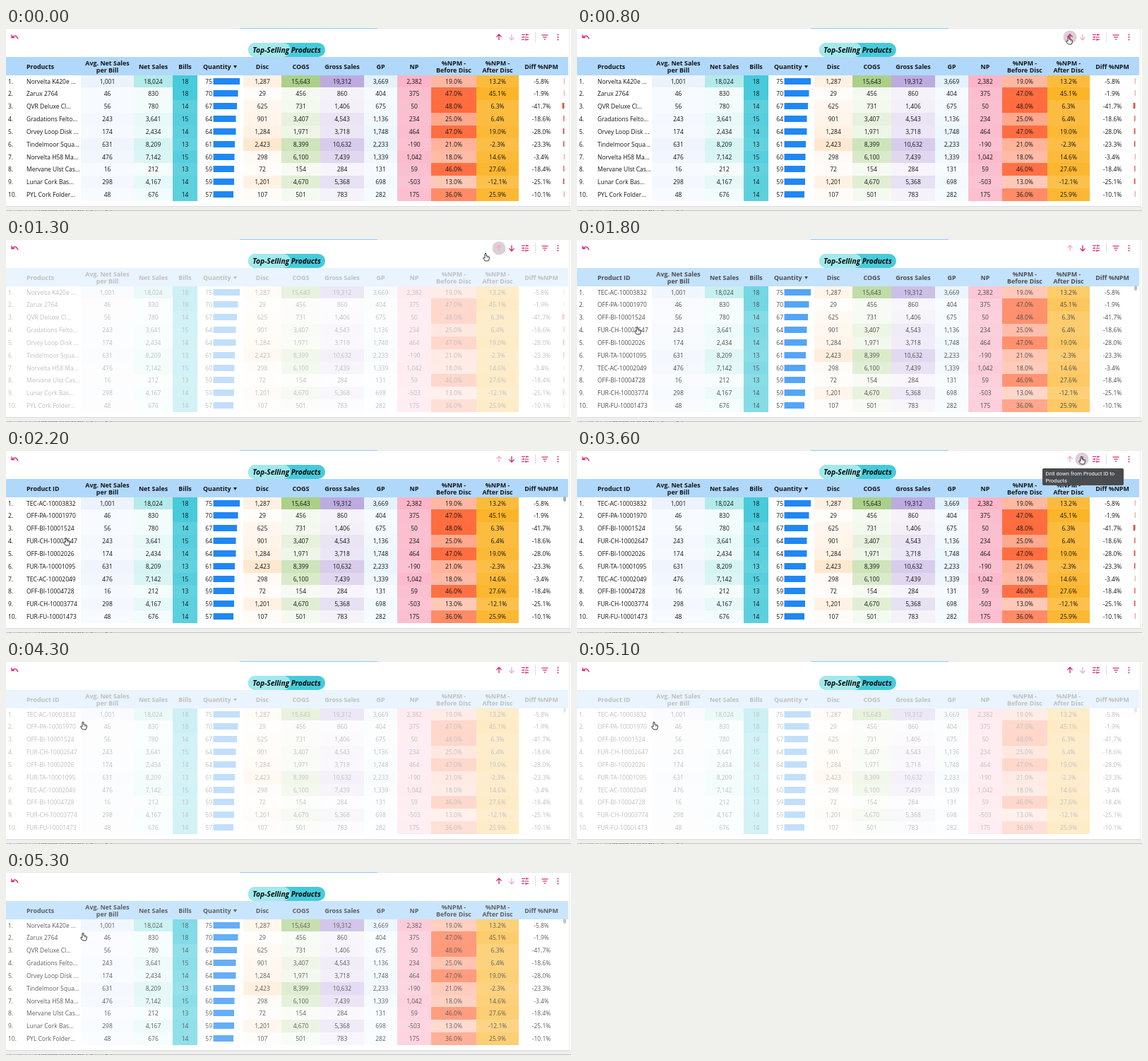
These frames come from a looping animation (800 by 259 pixels, 5.4 s). An HTML page with a canvas:

```html
<!DOCTYPE html>
<html lang="en">
<head>
<meta charset="utf-8">
<title>Top-Selling Products</title>
<style>
html, body { margin: 0; width: 100%; height: 100%; overflow: hidden; background: #fff; }
canvas { display: block; width: 800px; height: 259px; }
</style>
</head>
<body>
<canvas id="stage" width="800" height="259"></canvas>
<script>
const ctx = document.getElementById('stage').getContext('2d');
const LOOP = 5400, STEP = 100;
const TOP = 67, ROW = 17.85, WIDTH = 796;
const FONT = '"Open Sans", "Noto Sans", sans-serif';
const PINK = '#d81b72', PINK_DIM = '#f0a9cb', INK = '#141414';

const num = v => Math.round(v).toLocaleString('en-US');
const pct = v => v.toFixed(1) + '%';
const rowY = i => Math.floor(TOP + i * ROW);

// All other figures follow from these five
const products = [
  ['Norvelta K420e ...', 'TEC-AC-10003832', 18, 75, 1287.4, 19311.8, 19],
  ['Zarux 2764', 'OFF-PA-10001970', 18, 70, 29.3, 859.7, 47],
  ['QVR Deluxe Cl...', 'OFF-BI-10001524', 14, 67, 625.15, 1405.6, 48],
  ['Gradations Felto...', 'FUR-CH-10002647', 15, 64, 901.3, 4542.7, 25],
  ['Orvey Loop Disk ...', 'OFF-BI-10002026', 14, 64, 1284, 3718.2, 47],
  ['Tindelmoor Squa...', 'FUR-TA-10001095', 13, 61, 2423, 10632, 21],
  ['Norvelta H58 Ma...', 'TEC-AC-10002049', 15, 60, 297.55, 7439.4, 18],
  ['Mervane Ulst Cas...', 'OFF-BI-10004728', 13, 59, 72.2, 284.4, 46],
  ['Lunar Cork Bas...', 'FUR-CH-10003774', 14, 59, 1201, 5368, 13],
  ['PYL Cork Folder...', 'FUR-FU-10001473', 14, 57, 107, 783, 36]
].map(([name, id, bills, qty, disc, gross, before]) => {
  const net = gross - disc, gp = gross * before / 100, np = gp - disc;
  const after = np / net * 100;
  return { name, id, bills, qty, disc, gross, before, net, gp, np, after,
    avg: net / bills, cogs: gross - gp, diff: after - before };
});

// Field, title, width, heat colour and its strength at the lowest value
let edge = 106;
const columns = [
  ['avg', 'Avg. Net Sales|per Bill', 75, '#ecf3fd', .4],
  ['net', 'Net Sales', 55, '#b4ebea', .15],
  ['bills', 'Bills', 35, '#47cada', .85],
  ['qty', 'Quantity', 65],
  ['disc', 'Disc', 54, '#ffe8d0', .12],
  ['cogs', 'COGS', 55, '#abd08a', .1],
  ['gross', 'Gross Sales', 62, '#bdabdf', .13],
  ['gp', 'GP', 47, '#e3f2fd', .3],
  ['np', 'NP', 48, '#fbb4c8', .8],
  ['before', '%NPM -|Before Disc', 64, '#ff6c3e', .37],
  ['after', '%NPM -|After Disc', 60, '#fcb428', .83],
  ['diff', 'Diff %NPM', 64]
].map(([key, title, w, color, floor]) => {
  const values = products.map(p => p[key]), x = edge;
  edge += w;
  return { key, title, w, color, floor, x, mid: x + w / 2,
    min: Math.min(...values), max: Math.max(...values),
    format: title.includes('%') ? pct : num };
});

// Cursor keys: time, x, y of the fingertip
const path = [[500, 620, 60], [800, 696, 12], [1200, 696, 12], [1300, 679, 20], [1700, 85, 124],
  [2300, 85, 124], [2800, 684, 10], [3100, 714, 9], [3900, 714, 9], [4200, 109, 86]];

const ramp = (t, from, len) => Math.min(1, Math.max(0, (t - from) / len));
const smooth = k => k * k * (3 - 2 * k);
const during = (t, a, b) => t >= a && t < b;
const veil = t => .73 * (ramp(t, 900, 200) - ramp(t, 1600, 300) + ramp(t, 3700, 200) - ramp(t, 5130, 300));

function cursorAt(t) {
  let [, x, y] = path[0];
  for (let i = 1; i < path.length; i++) {
    const [from, x0, y0] = path[i - 1], [to, x1, y1] = path[i];
    const k = smooth(ramp(t, from, to - from));
    x += (x1 - x0) * k;
    y += (y1 - y0) * k;
  }
  return { x, y };
}

function rect(x, y, w, h, fill) {
  ctx.fillStyle = fill;
  ctx.fillRect(x, y, w, h);
}

function pill(x, y, w, h, r, fill) {
  ctx.fillStyle = fill;
  ctx.beginPath();
  ctx.roundRect(x, y, w, h, r);
  ctx.fill();
}

function text(s, x, y, { size = 8.5, weight = '500', align = 'center', color = INK, family = FONT } = {}) {
  ctx.font = `${weight} ${size}px ${family}`;
  ctx.textAlign = align;
  ctx.fillStyle = color;
  ctx.fillText(s, x, y);
}

function lines(color, width, ...paths) {
  ctx.strokeStyle = color;
  ctx.lineWidth = width;
  ctx.beginPath();
  for (const p of paths)
    for (let i = 0; i < p.length; i += 2) i ? ctx.lineTo(p[i], p[i + 1]) : ctx.moveTo(p[0], p[1]);
  ctx.stroke();
}

function heading(title, x, align = 'center') {
  const parts = title.split('|');
  const first = parts.length > 1 ? 53 : 57.5;
  parts.forEach((s, i) => text(s, x, first + i * 9.5, { size: 8.9, weight: 'bold', align }));
}

function heatCell(col, value, y, h) {
  ctx.globalAlpha = col.floor + (1 - col.floor) * (value - col.min) / (col.max - col.min);
  rect(col.x, y, col.w, h, col.color);
  ctx.globalAlpha = 1;
}

function tableRow(p, i, byId, hovered) {
  const y = rowY(i), base = y + 12;
  text(i + 1 + '.', 3, base, { align: 'left' });
  text(byId ? p.id : p.name, 29, base, { align: 'left' });
  for (const col of columns) {
    const value = p[col.key];
    if (col.color) heatCell(col, value, y, rowY(i + 1) - y);
    if (col.key === 'qty') {
      text(value, 292, base, { align: 'right' });
      rect(293.5, y + 4, value * .5, 9, '#1f88f3');
    } else {
      text(col.format(value), col.mid, base);
    }
  }
  if (!hovered) {
    const w = Math.max(.6, -p.diff * .07);
    rect(790.5 - w, y + 4, w, 8, '#de5648');
  }
}

function table(byId, hovered, cover) {
  rect(0, 41, WIDTH, 26, '#b0d8fb');
  heading(byId ? 'Product ID' : 'Products', 29, 'left');
  for (const col of columns)
    col.key === 'qty' ? heading(col.title, 279, 'left') : heading(col.title, col.mid);
  ctx.beginPath();
  ctx.moveTo(322, 53);
  ctx.lineTo(327, 53);
  ctx.lineTo(324.5, 57);
  ctx.fill();

  products.forEach((p, i) => tableRow(p, i, byId, hovered));
  if (hovered) pill(789, 66, 4, 7, 2, '#aaa');
  rect(0, 41, WIDTH, 206, `rgba(255,255,255,${cover})`);
}

function arrow(x, dir, color) {
  lines(color, 1.3, [x, 13 + 4 * dir, x, 13 - 4 * dir],
    [x - 3.6, 13 - .4 * dir, x, 13 - 4 * dir, x + 3.6, 13 - .4 * dir]);
}

function slider(y, knob, gap) {
  lines(PINK, 1.2, [730, y, Math.min(knob, gap) - 1, y], [Math.max(knob, gap), y, 740, y],
    [knob, y - 1.5, knob, y + 1.5]);
}

function toolbar(byId, hoverX) {
  if (hoverX) pill(hoverX - 9.5, 3.5, 19, 19, 9.5, '#dccfd7');
  lines(PINK, 1.3, [8, 9.5, 8, 13.5, 12, 13.5]);
  ctx.beginPath();
  ctx.moveTo(8.3, 13.2);
  ctx.quadraticCurveTo(14, 8, 17, 15.5);
  ctx.stroke();

  arrow(698, 1, byId ? PINK_DIM : PINK);
  arrow(716, -1, byId ? PINK : PINK_DIM);
  slider(9.5, 737, 736);
  slider(13, 732.5, 734);
  slider(16.5, 736, 735);
  lines('#ddd', 1, [749.5, 6, 749.5, 20]);
  for (let i = 0; i < 3; i++) {
    const y = 10 + i * 3, half = 4.5 - i * 1.7;
    lines(PINK, 1.2, [763 - half, y, 763 + half, y]);
    pill(780.5, 8.5 + i * 3.5, 2, 2, 1, PINK);
  }
}

function backdrop() {
  rect(0, 0, 800, 259, '#fff');
  rect(0, 0, 800, 1, '#e6e8ea');
  rect(331, 0, 195, 1, '#8fc4fb');
  rect(797, 1, 1, 252, '#ececec');
  rect(0, 252, 800, 7, '#eee');
  rect(0, 252, 798, 1, '#dcdcdc');
  rect(0, 258, 800, 1, '#c4c4c4');
  text('Last Updated: 1/29/2025 10:23:52 PM  |  Privacy Policy', 5, 262,
    { size: 6, align: 'left', color: '#555' });
}

function banner() {
  pill(343, 21, 109, 20, 10, '#45cbda');
  pill(343, 21, 60, 20, 10, '#a2e9ed');
  text('Top-Selling Products', 397.5, 35, { size: 10.2, weight: 'italic bold', color: '#0a0a0a' });
}

function tooltip() {
  const style = { size: 7.6, weight: '400', align: 'left', color: '#fff', family: 'Roboto, sans-serif' };
  pill(659, 26, 115, 24, 2, '#4a4b4e');
  text('Drill down from Product ID to', 663.5, 36, style);
  text('Products', 663.5, 45.5, style);
}

function hand({ x, y }) {
  ctx.save();
  ctx.translate(x, y);
  ctx.beginPath();
  ctx.moveTo(-1, 6);
  ctx.lineTo(-1, 1);
  ctx.quadraticCurveTo(0, -.8, 1, 1);
  ctx.lineTo(1, 4);
  ctx.quadraticCurveTo(5.5, 4, 5.5, 6);
  ctx.lineTo(5, 9);
  ctx.lineTo(4, 11);
  ctx.lineTo(-.5, 11);
  ctx.lineTo(-3.5, 7);
  ctx.quadraticCurveTo(-3, 5.2, -1, 7);
  ctx.closePath();
  ctx.fillStyle = '#fff';
  ctx.fill();
  ctx.strokeStyle = '#222';
  ctx.lineWidth = .9;
  ctx.stroke();
  lines('#222', .5, [2.4, 5, 2.4, 7], [4, 5, 4, 7]);
  ctx.restore();
}

function draw(t) {
  const cursor = cursorAt(t);
  const hovered = t >= 500 && cursor.y > 41 && cursor.x < 600;
  const hoverX = during(t, 700, 1400) ? 698 : during(t, 3000, 4000) ? 715 : 0;
  backdrop();
  table(during(t, 1700, 5200), hovered, veil(t));
  banner();
  toolbar(during(t, 1100, 3900), hoverX);
  if (during(t, 3400, 3800)) tooltip();
  if (t >= 500) hand(cursor);
}

const start = performance.now();
function tick() {
  const t = (performance.now() - start) % LOOP;
  draw(Math.floor(t / STEP) * STEP);
  requestAnimationFrame(tick);
}
tick();
</script>
</body>
</html>
```
